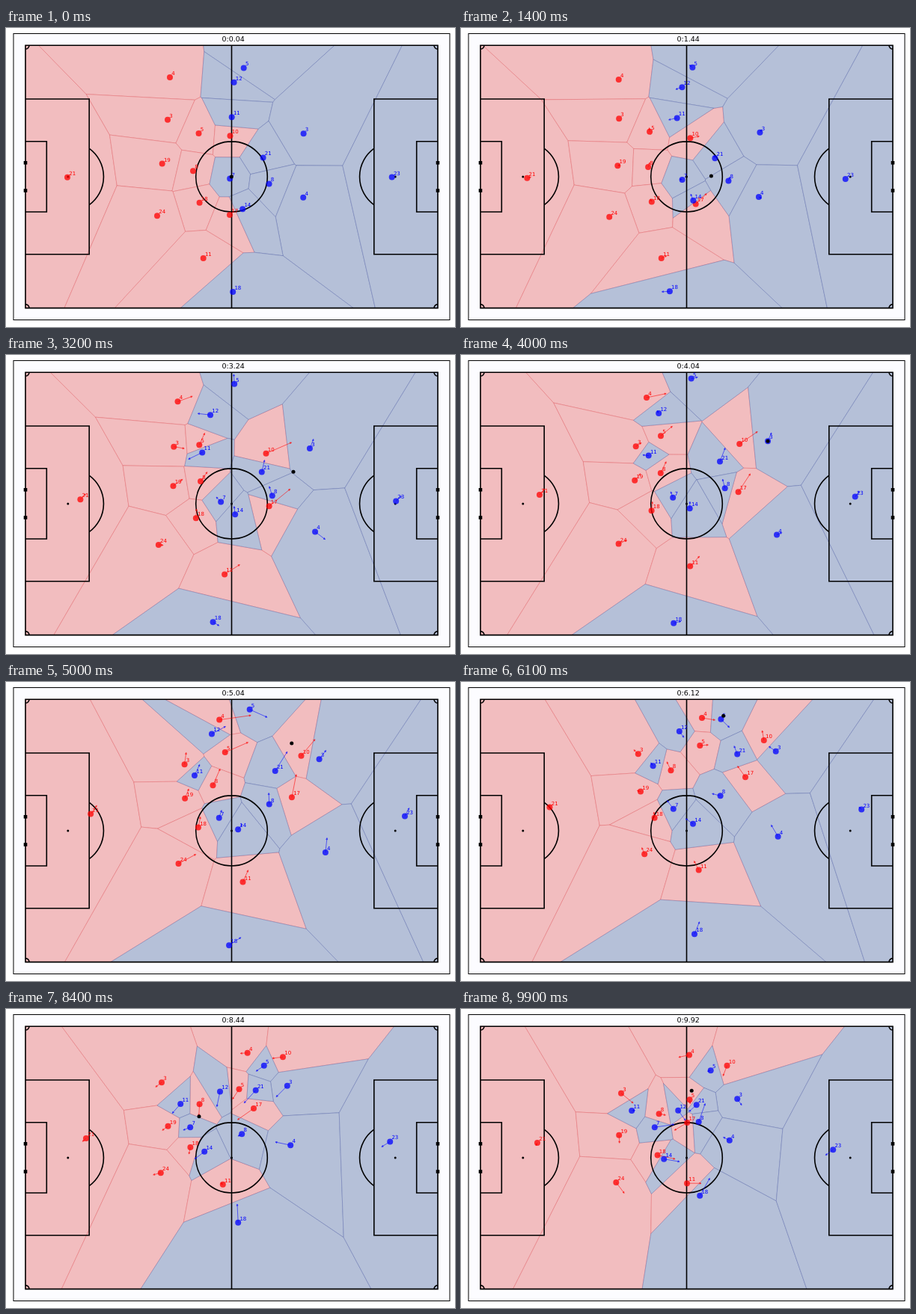
Recreate the animation shown at these times as an HTML page. Size 600x400 px, loop 10000 ms.

```html
<!DOCTYPE html>
<html lang="en">
<head>
<meta charset="utf-8">
<title>Pitch control</title>
<style>
  html, body { margin: 0; width: 100%; height: 100%; overflow: hidden; background: #fff; }
  svg { display: block; width: 100vw; height: 100vh; }
  text { font-family: "DejaVu Sans", sans-serif; font-size: 7px; }
  #clock { font-size: 9.5px; }
  .red { --team: #f00; --area: #f2bdbf; --edge: #d83038; }
  .blue { --team: #00f; --area: #b5c0d8; --edge: #2c3f92; }
  .cell { fill: var(--area); stroke: var(--edge); stroke-opacity: .5; stroke-width: .6; }
  .dot { fill: var(--team); fill-opacity: .75; }
  .label { fill: var(--team); }
  .arrow { fill: var(--team); stroke: var(--team); stroke-width: .7; opacity: .8; }
  .lines { fill: none; stroke: #000; stroke-width: 1.6; }
</style>
</head>
<body>
<svg viewBox="0 0 600 400">
  <rect x="10" y="7.5" width="583" height="383" fill="#fcfcff" stroke="#000"/>
  <g id="cells"></g>
  <path id="markings" class="lines"/>
  <g id="spots"></g>
  <g id="players"></g>
  <circle id="ball" r="2.5"/>
  <text id="clock" x="288.5" y="18.3"></text>
</svg>
<script>
const LEFT = 26, RIGHT = 577, TOP = 23.2, BOTTOM = 374.6;
const CENTER_X = (LEFT + RIGHT) / 2, CENTER_Y = (TOP + BOTTOM) / 2;
const STEP = 100, STEPS = 100;
const KEY_TIMES = [0, 2.4, 4, 6.1, 7.5, 8.4, 9.9];
const byId = id => document.getElementById(id);

function add(parent, tag, attributes) {
  const node = document.createElementNS('http://www.w3.org/2000/svg', tag);
  for (const name in attributes) node.setAttribute(name, attributes[name]);
  return parent.appendChild(node);
}

function drawPitch() {
  const rx = 47.8, ry = 47, corner = 5;
  let path = `M${CENTER_X} ${TOP}V${BOTTOM}` +
    `M${CENTER_X - rx} ${CENTER_Y}a${rx} ${ry} 0 1 0 ${2 * rx} 0a${rx} ${ry} 0 1 0 ${-2 * rx} 0`;
  const spot = x => add(byId('spots'), 'circle', { cx: x, cy: CENTER_Y, r: 1.5 });
  spot(CENTER_X);
  for (const [goal, dir] of [[LEFT, 1], [RIGHT, -1]]) {
    const box = (depth, half) =>
      `M${goal} ${CENTER_Y - half}h${dir * depth}v${2 * half}h${-dir * depth}`;
    const sweep = dir > 0 ? 1 : 0;
    path += `M${goal} ${TOP}V${BOTTOM}` + box(85.2, 103.9) + box(28.3, 47.1) +
      `M${goal + dir * 85.2} ${CENTER_Y - 37.7}a${rx} ${ry} 0 0 ${sweep} 0 75.4` +
      `M${goal + dir * corner} ${TOP}a${corner} ${corner} 0 0 ${sweep} ${-dir * corner} ${corner}` +
      `M${goal + dir * corner} ${BOTTOM}a${corner} ${corner} 0 0 ${1 - sweep} ${-dir * corner} ${-corner}`;
    spot(goal + dir * 56.8);
    for (const post of [-18.6, 18.6])
      add(byId('spots'), 'rect', { x: goal - 2.3, y: CENTER_Y + post - 2.3, width: 4.6, height: 4.6 });
  }
  for (const y of [TOP, BOTTOM]) path += `M${LEFT - .8} ${y}H${RIGHT + .8}`;
  byId('markings').setAttribute('d', path);
}

const players = [];

// One key point for each key time; speeds follow from the points.
function player(team, number, ...points) {
  const group = add(byId('players'), 'g', { class: team });
  const label = add(group, 'text', { class: 'label', x: 2.2, y: -3 });
  label.textContent = number;
  players.push({
    points, group, speeds: speedsThrough(points),
    cell: add(byId('cells'), 'polygon', { class: `${team} cell` }),
    arrow: add(group, 'path', { class: 'arrow' }),
    dot: add(group, 'circle', { class: 'dot', r: 4 })
  });
}

// Slopes of the parabola through each point and its two neighbours.
function speedsThrough(points) {
  const last = points.length - 1;
  const span = i => KEY_TIMES[i + 1] - KEY_TIMES[i];
  const axis = k => {
    const slope = i => (points[i + 1][k] - points[i][k]) / span(i);
    const inner = i => (slope(i - 1) * span(i) + slope(i) * span(i - 1)) / (span(i - 1) + span(i));
    return points.map((_, i) =>
      i === 0 ? 2 * slope(0) - inner(1) :
      i === last ? 2 * slope(last - 1) - inner(last - 1) : inner(i));
  };
  const vx = axis(0), vy = axis(1);
  return points.map((_, i) => [vx[i], vy[i]]);
}

player('red', 21, [82, 199.7], [94, 198], [105, 187], [118.5, 167.5], [112, 169], [107, 173], [102, 179]);
player('red', 4, [219, 66], [217, 67], [248, 57], [322, 48], [330, 58.7], [322.7, 58.7], [305, 61.5]);
player('red', 3, [216, 122.8], [215, 121], [233.7, 122.3], [236.8, 96.3], [221.8, 94.8], [208, 98.3], [214, 112.7]);
player('red', 5, [257.5, 141], [254, 131], [267, 108.2], [319.3, 85], [322, 93.3], [311.5, 107.3], [305.5, 121.3]);
player('red', 10, [299.5, 144.3], [323.5, 141.6], [372.2, 119], [404.8, 78], [385, 65.8], [370, 64.2], [355.5, 75.8]);
player('red', 19, [208.7, 181.6], [214.8, 181.2], [232.2, 167.8], [240, 146.6], [225.6, 153], [216.5, 156.7], [211.2, 168.8]);
player('red', 8, [250, 191.2], [254, 178], [266.8, 158], [280.5, 118.2], [262, 109.3], [258.6, 127.3], [264.6, 140.3]);
player('red', 18, [258.6, 233.7], [253.7, 226.6], [254.6, 208.2], [258.6, 181.7], [255, 175.7], [246.4, 185], [262.6, 195.6]);
player('red', 24, [202, 251.2], [200, 253.2], [210.6, 252.6], [245.2, 230.2], [221.6, 220], [206.8, 219.2], [207.3, 232]);
player('red', 11, [263.7, 308], [277.8, 302.2], [306.2, 282.6], [317.7, 251.6], [298.2, 237.3], [289.8, 234.8], [302, 233.2]);
player('red', 17, [299, 250], [331, 219.2], [370.6, 183.2], [380, 127.2], [351.6, 118], [331, 133], [302.2, 152]);

player('blue', 5, [317.7, 53.4], [306.6, 47.7], [307.7, 31.6], [347.4, 49.8], [356, 67.4], [344.8, 75.8], [333.7, 82.2]);
player('blue', 12, [304.6, 72.7], [285.6, 80.8], [264.2, 78], [291.8, 66], [293.6, 90.3], [286, 110.4], [290.2, 135.7]);
player('blue', 11, [301.7, 119.3], [276.2, 124], [250.7, 134.6], [256.6, 112.2], [247.2, 112.3], [233.2, 127], [228.2, 136]);
player('blue', 3, [397.6, 141.2], [402.4, 133.7], [410, 115.2], [420.7, 92.7], [394.6, 87.8], [375.8, 102.8], [369.2, 120.2]);
player('blue', 21, [343.6, 173.4], [339.7, 167.2], [346, 142.6], [369.2, 96.6], [349.2, 91.4], [333.7, 108.8], [314.7, 128.2]);
player('blue', 7, [299.2, 201.5], [291.7, 200.7], [283.2, 190.7], [283.8, 169.8], [264.2, 153], [246.2, 158.3], [258.8, 158.2]);
player('blue', 8, [351.6, 208.4], [358, 197.2], [352.7, 178.2], [346.6, 152.2], [323.6, 157.2], [315.2, 167.2], [317.7, 151]);
player('blue', 4, [397.2, 226.7], [403.7, 229.2], [422, 240.6], [423.6, 206.7], [401.7, 186], [380.2, 182.2], [358.8, 175.8]);
player('blue', 14, [316.2, 242.2], [307.6, 221.7], [305.7, 205.2], [310, 189.8], [285.8, 180.4], [265.2, 190.8], [271.2, 200.7]);
player('blue', 18, [303.2, 353], [273.2, 353.6], [284.2, 358.8], [312, 337.2], [315.2, 308.6], [310.2, 285.8], [319.2, 249.7]);
player('blue', 23, [515.7, 199.6], [516.2, 199.7], [526.7, 189.6], [535.2, 170.6], [523.7, 171.2], [513.2, 177.4], [497.2, 188.2]);

const ballPoints = [[301.3, 199], [358, 197.2], [410, 115.2], [350.7, 45.3], [244.6, 129], [258, 143.7], [308.2, 109.3]];

function segmentAt(time) {
  let index = KEY_TIMES.findIndex(key => key > time) - 1;
  if (index < 0) index = KEY_TIMES.length - 2;
  const span = KEY_TIMES[index + 1] - KEY_TIMES[index];
  return { index, span, u: (time - KEY_TIMES[index]) / span };
}

// Cubic Hermite curve between two key points, with its speed.
function motion({ points, speeds }, { index, span, u }) {
  const axis = k => {
    const from = points[index][k], move = points[index + 1][k] - from;
    const va = speeds[index][k] * span, vb = speeds[index + 1][k] * span;
    const c2 = 3 * move - 2 * va - vb, c3 = va + vb - 2 * move;
    return [from + u * (va + u * (c2 + u * c3)), (va + u * (2 * c2 + 3 * u * c3)) / span];
  };
  const [x, vx] = axis(0), [y, vy] = axis(1);
  return { x, y, vx, vy };
}

// Keeps the part of a polygon that lies nearer to p than to q.
function clipNearer(polygon, p, q) {
  const nx = q.x - p.x, ny = q.y - p.y;
  const limit = (nx * (p.x + q.x) + ny * (p.y + q.y)) / 2;
  const side = ([x, y]) => nx * x + ny * y - limit;
  const kept = [];
  polygon.forEach((a, i) => {
    const b = polygon[(i + 1) % polygon.length];
    const sa = side(a), sb = side(b);
    if (sa <= 0) kept.push(a);
    if (sa * sb < 0) {
      const k = sa / (sa - sb);
      kept.push([a[0] + k * (b[0] - a[0]), a[1] + k * (b[1] - a[1])]);
    }
  });
  return kept;
}

// The arrow reaches where the player would be one second later.
function arrowPath({ vx, vy }) {
  const length = Math.hypot(vx, vy);
  if (length < 2) return '';
  const ux = vx / length, uy = vy / length;
  const bx = vx - ux * 2.2, by = vy - uy * 2.2;
  return `M0 0L${bx} ${by}M${vx} ${vy}L${bx - uy} ${by + ux}L${bx + uy} ${by - ux}Z`;
}

function render(step) {
  const segment = segmentAt(step * STEP / 1000);
  const states = players.map(p => motion(p, segment));
  const pitch = [[LEFT, TOP], [RIGHT, TOP], [RIGHT, BOTTOM], [LEFT, BOTTOM]];
  players.forEach((p, i) => {
    const state = states[i];
    const cell = states.reduce((poly, other) => other === state ? poly : clipNearer(poly, state, other), pitch);
    p.cell.setAttribute('points', cell.join(' '));
    p.group.setAttribute('transform', `translate(${state.x} ${state.y})`);
    p.arrow.setAttribute('d', step ? arrowPath(state) : '');
  });
  const a = ballPoints[segment.index], b = ballPoints[segment.index + 1];
  byId('ball').setAttribute('cx', a[0] + segment.u * (b[0] - a[0]));
  byId('ball').setAttribute('cy', a[1] + segment.u * (b[1] - a[1]));
  // The match clock counts 25 ticks a second.
  byId('clock').textContent = '0:' + ((Math.floor(step * 2.5) + 1) / 25).toFixed(2);
}

drawPitch();
render(0);
const begin = performance.now();
function tick() {
  render(Math.floor((performance.now() - begin) / STEP) % STEPS);
  requestAnimationFrame(tick);
}
requestAnimationFrame(tick);
</script>
</body>
</html>
```
